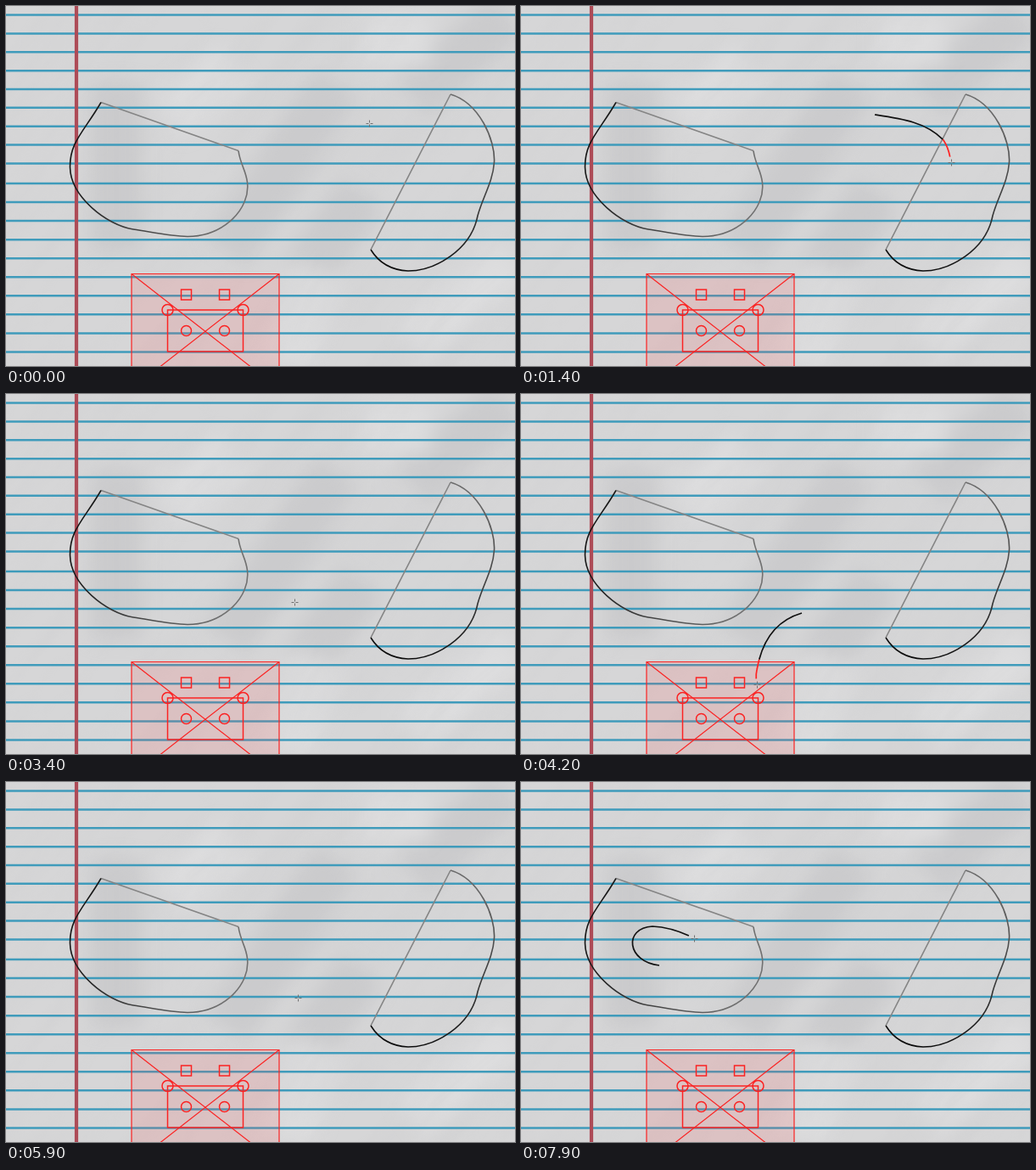
Write an HTML page that moves like this. It is 600 px wide and 424 px high and loops after 8 s.

```html
<!DOCTYPE html>
<html lang="en">
<head>
<meta charset="utf-8">
<title>Drawing on lined paper</title>
<style>
  html, body { margin: 0; width: 100%; height: 100%; overflow: hidden; background: #d5d5d6; }
  svg { display: block; width: 600px; height: 424px; }
</style>
</head>
<body>
<svg viewBox="0 0 600 424" fill="none">
  <defs>
    <filter id="soft" filterUnits="userSpaceOnUse" x="-50" y="-50" width="700" height="524"><feGaussianBlur stdDeviation="11"/></filter>
    <filter id="ink" filterUnits="userSpaceOnUse" x="-5" y="-5" width="610" height="434"><feGaussianBlur stdDeviation=".4"/></filter>
    <filter id="print" filterUnits="userSpaceOnUse" x="-5" y="-5" width="610" height="434"><feGaussianBlur stdDeviation=".75"/></filter>
    <filter id="crumple" x="0" y="0" width="100%" height="100%">
      <feTurbulence type="fractalNoise" baseFrequency=".006 .03" numOctaves="3" seed="4"/>
      <feColorMatrix values="0 0 0 0 .6  0 0 0 0 .6  0 0 0 0 .61  1.3 0 0 0 -.5"/>
    </filter>
    <linearGradient id="leftInk" gradientUnits="userSpaceOnUse" x1="80" y1="150" x2="270" y2="210">
      <stop stop-color="#111"/><stop offset="1" stop-color="#707070"/>
    </linearGradient>
    <linearGradient id="rightInk" gradientUnits="userSpaceOnUse" x1="540" y1="104" x2="470" y2="312">
      <stop stop-color="#6e6e6e"/><stop offset="1" stop-color="#0c0c0c"/>
    </linearGradient>
  </defs>

  <rect width="600" height="424" fill="#d6d6d7"/>
  <g filter="url(#soft)" stroke-width="60" opacity=".5">
    <path stroke="#c0c0c2" d="M130 90V290M390 90L260 290M590 10L480 110M420 220L350 320"/>
    <path stroke="#e3e3e4" d="M190 130L270 70M370 310L330 424M420 40H500M480 400L600 300"/>
  </g>
  <rect x="-150" y="-200" width="900" height="820" transform="rotate(-52 300 212)" filter="url(#crumple)" opacity=".45"/>

  <g id="rules" stroke="#3f9bbb" stroke-width="2.5" filter="url(#print)"></g>
  <path d="M83 0V424" stroke="#ad4b57" stroke-width="4.2" filter="url(#print)"/>

  <g stroke-width="1.6" stroke-linejoin="round" filter="url(#ink)">
    <path stroke="#858585" d="M112 113.500L274 170.500M524 104L430 287"/>
    <path stroke="url(#leftInk)" d="M112 113.500C92 148 75 160 75.500 190C76 224 118 258 150 263C176 267 194 271 214 271.500C258 271 288 238 284.500 208C283 194 276 186 274 170.500"/>
    <path stroke="url(#rightInk)" d="M524 104C558 114 577 158 575.500 184C574 207 562 225 556 247C548 288 505 312 474 312C452 311 438 300 430 287"/>
  </g>

  <g stroke="#fb2222" stroke-width="1.5" filter="url(#ink)">
    <path fill="#f55" fill-opacity=".15" stroke-width="1.2" d="M148 315.500H322V451H148Z"/>
    <path d="M190.500 358H279.500V407H190.500Z"/>
    <g id="half">
      <path stroke-width="1.2" d="M148 315.500L322 451"/>
      <path d="M206.500 334H218.500V346H206.500Z"/>
      <circle cx="190.500" cy="358" r="6.500"/>
      <circle cx="212.500" cy="382.500" r="6"/>
    </g>
    <use href="#half" transform="matrix(-1 0 0 1 470 0)"/>
  </g>

  <g id="ink-strokes" stroke-width="1.7" filter="url(#ink)"></g>
  <path id="pen" stroke="#707070" d="M-4 0H-1M1 0H4M0 -4V-1M0 1V4"/>
</svg>

<script>
const LOOP = 8000, STEP = 100, LAG = 7;

// Each stroke is drawn at constant speed; past `red` px it has crossed an outline.
const strokes = [
  { from: 650, to: 2800, red: 87,
    d: 'M417 128C450 133 478 137 498 158C506 170 507 184 508 198C512 238 475 258 426 258C405 258 396 259 385 252Q372 240 365 212' },
  { from: 3630, to: 5400, red: 78,
    d: 'M331 258C290 270 282 305 278 325C270 360 320 398 362 398C380 398 393 392 406 383C425 370 440 350 442 322' },
  { from: 7200, to: 7900, red: Infinity,
    d: 'M163 216C125 212 120 172 155 170C175 171 190 177 204 184' }
];

const byId = id => document.getElementById(id);

function addPath(parent, d, stroke) {
  const path = document.createElementNS('http://www.w3.org/2000/svg', 'path');
  path.setAttribute('d', d);
  if (stroke) path.setAttribute('stroke', stroke);
  return parent.appendChild(path);
}

for (let i = 0; i < 19; i++) {
  const y = i < 9 ? 10.6 + 21.85 * i : 209 + 22.05 * (i - 9);
  addPath(byId('rules'), `M0 ${y}H600`);
}

// Resting points of the pen; it glides straight between them.
const stops = [{ t: 0, x: 428, y: 138 }, { t: 6800, x: 168, y: 131 }];

for (const s of strokes) {
  s.black = addPath(byId('ink-strokes'), s.d, '#111');
  s.redInk = addPath(byId('ink-strokes'), s.d, '#f22');
  s.length = s.black.getTotalLength();
  for (const [t, at] of [[s.from, 0], [s.to, s.length]]) {
    const { x, y } = s.black.getPointAtLength(at);
    stops.push({ t, x, y });
  }
}
stops.sort((a, b) => a.t - b.t);

function glide(t) {
  const next = Math.max(1, stops.findIndex(p => p.t >= t));
  const a = stops[next - 1], b = stops[next];
  const u = (t - a.t) / (b.t - a.t);
  return { x: a.x + (b.x - a.x) * u, y: a.y + (b.y - a.y) * u };
}

function showPart(path, from, to) {
  path.style.visibility = to > from ? 'visible' : 'hidden';
  if (to > from) path.setAttribute('stroke-dasharray', `0 ${from} ${to - from} 9999`);
}

function draw(now) {
  const t = Math.floor(now % LOOP / STEP) * STEP;
  let pen;
  for (const s of strokes) {
    const active = t >= s.from && t <= s.to;
    const reach = active ? s.length * (t - s.from) / (s.to - s.from) : 0;
    showPart(s.black, 0, Math.min(reach - LAG, s.red));
    showPart(s.redInk, s.red, reach - LAG);
    if (active) pen = s.black.getPointAtLength(reach);
  }
  pen = pen || glide(t);
  byId('pen').setAttribute('transform',
    `translate(${Math.round(pen.x) + .5} ${Math.round(pen.y) + .5})`);
}

const start = performance.now();
function tick() {
  draw(performance.now() - start);
  requestAnimationFrame(tick);
}
tick();
</script>
</body>
</html>
```
